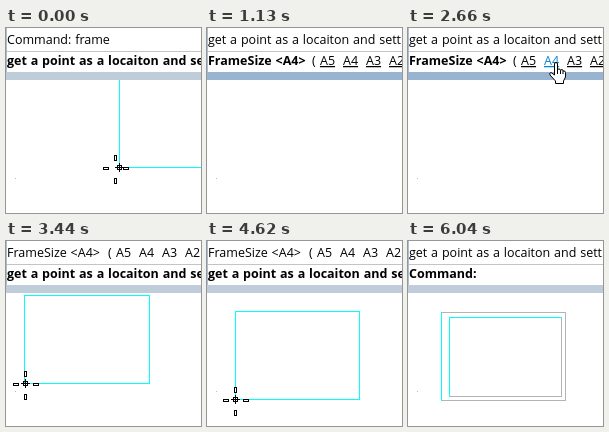
Write an HTML page that moves like this. It is 195 by 185 pixels and loops after 6140 ms.

```html
<!DOCTYPE html>
<html lang="en">
<head>
<meta charset="utf-8">
<title>Frame command</title>
<style>
  html, body { margin: 0; width: 100%; height: 100%; overflow: hidden; background: #fff; }
  svg { display: block; width: 195px; height: 185px; }
  text { font: 12.5px "Open Sans", "Noto Sans", sans-serif; word-spacing: .6px; white-space: pre; fill: #000; }
  .bold { font-weight: 700; }
  .key { text-decoration: underline; }
  .hot { fill: #0a84d0; }
  .line { fill: none; stroke-width: 1; shape-rendering: crispEdges; }
  .cursor { fill: #fff; stroke: #000; stroke-width: 1; }
  .off { display: none; }
</style>
</head>
<body>
<svg viewBox="0 0 195 185">
  <rect width="195" height="185" fill="#fff"/>
  <rect x="9" y="150" width="1" height="1" fill="#bbb"/>
  <rect id="preview" class="line" height="88" stroke="#0ff"/>
  <g id="drawing" class="line" stroke="#b4b4b4">
    <rect x="33.5" y="71.5" width="124" height="88"/>
    <rect x="41.5" y="76.5" width="112" height="79"/>
    <path stroke="#0ff" d="M33.5 71V160M41.5 156V76.5H154"/>
  </g>

  <rect width="195" height="44" fill="#fff"/>
  <rect y="23" width="195" height="1" fill="#c4c4c4"/>
  <rect id="bar" y="44" width="195" height="8"/>
  <rect width="1" height="44" fill="#a9bfd6"/>
  <g id="rows"></g>

  <g id="cross" class="line" stroke="#000">
    <g id="marks">
      <path fill="#fff" d="M-12.5 -1.5h5v2h-5zM7.5 -1.5h5v2h-5zM-1.5 -13.5h2v5h-2zM-1.5 9.5h2v5h-2z"/>
    </g>
    <path d="M-1.5 -1.5h4v4h-4zM-4 .5H5M.5 -4V5"/>
  </g>
  <path id="hand" class="cursor" d="M5.5 13V2Q5.5.5 7 .5T8.5 2V8Q8.5 7 10 7T11.5 8.5Q11.5 7.5 13 7.7T14 9Q16.5 8.5 16.5 10.5V15L14.5 19V21.5H6.5V19L1 13Q0 11 2 10.5L5.5 13zM8.5 8v4M11.5 8.5V12M14 9v3"/>
  <path id="arrow" class="cursor" d="M.5 .5V16L4 12.7L6.5 18.3L8.8 17.2L6.4 11.7H11.2z"/>
  <path id="resize" class="cursor" d="M4.5 .5L8.5 5H5.5V18H8.5L4.5 22.5L.5 18H3.5V5H.5z"/>
  <path id="beam" class="line" stroke="#000" d="M0 .5H3M4 .5H7M3.5 1V15M0 15.5H3M4 15.5H7"/>
  <path id="edge" class="line" stroke="#000" d="M193.5 28V38M192 33.5H195"/>
</svg>
<script>
const LOOP = 6140;
const WIDTH = 124.4;
const IDLE = "#bfcddb", ACTIVE = "#99b4d1";
const get = id => document.getElementById(id);

// time, screen, bar colour
const screens = [
  [0, "place", IDLE], [1010, "size", IDLE], [1130, "size", ACTIVE],
  [2800, "chosen", ACTIVE], [2920, "chosen", IDLE],
  [5040, "done", ACTIVE], [6040, "done", IDLE]
];

// time, corner x, corner y, lag of the marks
const previews = [
  [0, 113, 139, -4], [120, 102, 141, -2], [400],
  [3040, 61, 84], [3160, 28, 116], [3310, 22, 133],
  [3440, 18.2, 142], [3560, 18, 150], [3700, 18, 152],
  [3820, 19, 153], [3950, 20.8, 153], [4070, 23, 153],
  [4190, 24, 153], [4340, 27, 154], [4490, 28, 156],
  [4620, 28, 158], [4760, 32, 159], [4890, 33, 159], [5040]
];

// time, pointer, x, y
const pointers = [
  [0], [1530, "cross", 157, 65], [1650, "cross", 145, 60],
  [1810, "resize", 135, 36], [1960, "beam", 132, 33],
  [2110, "hand", 122, 40], [2240, "hand", 118, 37],
  [2390, "hand", 128, 39], [2510, "hand", 136, 36], [2660, "hand", 141, 34],
  [2920], [5040, "arrow", 33, 160], [5190, "arrow", 46, 156],
  [5340, "arrow", 60, 118], [5460, "beam", 80, 26], [5580]
];

// time, highlighted keyword
const hovers = [[0], [2110, "A5"], [2390], [2510, "A4"], [2800]];

const prompt = "get a point as a locaiton and setting";
const keys = ["A5", "A4", "A3", "A2"];
const label = (s, x, y, cls = "") =>
  `<text x="${x}" y="${y}" class="${cls}">${s}</text>`;

function sizeRow(x, y, main, key, hover) {
  return label("FrameSize &lt;A4&gt;", 1, y, main) + label("(", x, y) +
    keys.map((k, i) => label(k, x + 8 + 23 * i, y, key + (k === hover ? " hot" : ""))).join("");
}

const rows = {
  place: () => label("Command: frame", 1, 16) + label(prompt, 1, 37, "bold"),
  size: hover => label(prompt, 1, 16) + sizeRow(105, 37, "bold", "key", hover),
  chosen: () => sizeRow(102, 16, "", "") + label(prompt, 1, 37, "bold"),
  done: () => label(prompt, 1, 16) + label("Command:", 1, 37, "bold")
};

const at = (table, t) => table.findLast(row => row[0] <= t);
const show = (id, on) => get(id).classList.toggle("off", !on);
const move = (id, x, y) => get(id).setAttribute("transform", `translate(${x} ${y})`);

let shownRows = "";
function draw(t) {
  const [, screen, bar] = at(screens, t);
  const html = rows[screen](at(hovers, t)[1]);
  if (html !== shownRows) get("rows").innerHTML = shownRows = html;
  get("bar").setAttribute("fill", bar);

  const [, px, py, lag = 0] = at(previews, t);
  const [, pointer, x, y] = at(pointers, t);
  const placing = px !== undefined;
  show("preview", placing);
  for (const id of ["cross", "hand", "arrow", "resize", "beam"]) {
    show(id, id === pointer || (placing && id === "cross"));
    if (id === pointer) move(id, x, y);
  }
  if (placing) {
    const left = Math.round(px);
    move("preview", left + .5, py - 87.5);
    get("preview").setAttribute("width", Math.round(px + WIDTH) - left);
    move("cross", Math.ceil(px), py);
  }
  move("marks", 1 + lag, 2);
  show("drawing", t >= 5040);
  show("edge", t >= 5040 && t < 5190);
}

const start = performance.now();
function tick() {
  draw((performance.now() - start) % LOOP);
  requestAnimationFrame(tick);
}
tick();
</script>
</body>
</html>
```
